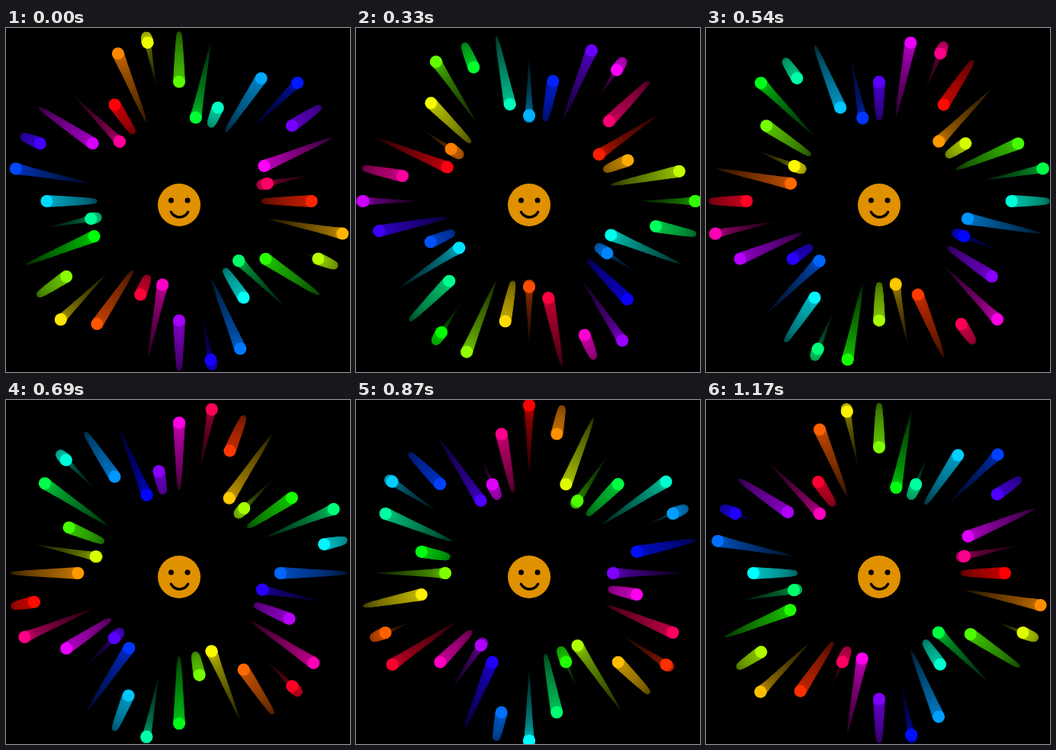
Animation of 451x451 px, one loop 1.2 s. Source, as an HTML page with a canvas:

```html
<!DOCTYPE html>
<html lang="en">
<head>
<meta charset="utf-8">
<title>Radial sparks</title>
<style>
  html, body { margin: 0; width: 100%; height: 100%; overflow: hidden; background: #000; }
  canvas { display: block; width: 451px; height: 451px; }
</style>
</head>
<body>
<canvas id="stage" width="451" height="451"></canvas>
<script>
const ctx = document.getElementById('stage').getContext('2d');
const LOOP = 1200, STEP = 30;
const CX = 227, CY = 227;
const COUNT = 32, MID = 165, SWING = 55;
const HEAD = 8, TRAIL = 140, TRAIL_STEP = 2.5;
const rad = deg => deg * Math.PI / 180;

function disc(x, y, r, fill) {
  ctx.fillStyle = fill;
  ctx.beginPath();
  ctx.arc(x, y, r, 0, 2 * Math.PI);
  ctx.fill();
}

// Each spark swings in and out; its tail is the path of the last 140 degrees of phase.
function spark(i, turn) {
  const spread = i * 360 / COUNT;
  const dir = rad(spread - 90);
  const phase = turn + spread * 6 - 81;
  const hue = (turn + spread * 3 + 99) % 360;
  const dot = (lag, r, light) => {
    const dist = MID - SWING * Math.cos(rad(phase - lag));
    disc(CX + dist * Math.cos(dir), CY + dist * Math.sin(dir), r,
      `hsl(${hue}, 100%, ${light}%)`);
  };
  for (let lag = TRAIL; lag > 0; lag -= TRAIL_STEP) {
    const left = 1 - lag / TRAIL;
    dot(lag, HEAD * left, 3 + 34 * left);
  }
  dot(0, HEAD, 50);
}

function face() {
  disc(CX, 232, 28, '#e09100');
  disc(216.5, 226, 3.5, '#000');
  disc(238, 226, 3.5, '#000');
  ctx.strokeStyle = '#000';
  ctx.lineWidth = 3.4;
  ctx.lineCap = 'round';
  ctx.beginPath();
  ctx.arc(CX + 0.5, 235.5, 12.5, rad(27), rad(153));
  ctx.stroke();
}

function draw(time) {
  const turn = Math.floor(time % LOOP / STEP) * STEP / LOOP * 360;
  ctx.fillStyle = '#000';
  ctx.fillRect(0, 0, 451, 451);
  for (let i = 0; i < COUNT; i++) spark(i, turn);
  face();
}

function tick(now) {
  draw(now);
  requestAnimationFrame(tick);
}
draw(0);
requestAnimationFrame(tick);
</script>
</body>
</html>
```
